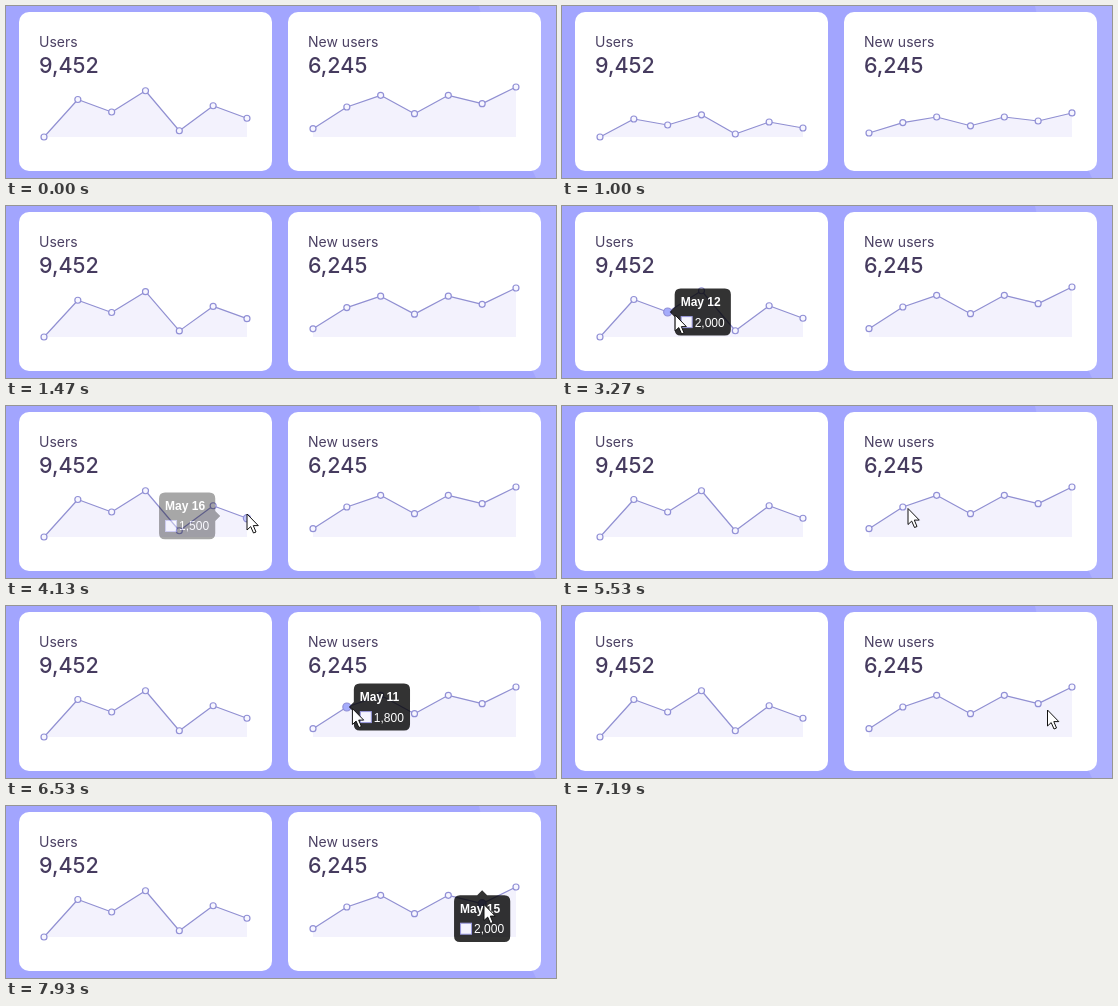
An HTML page for the animation above (7.99 s loop, 550 px wide and 172 px high).

```html
<!DOCTYPE html>
<html lang="en">
<head>
<meta charset="utf-8">
<title>User charts</title>
<style>
  html, body { margin: 0; width: 100%; height: 100%; overflow: hidden; background: #a2a5fe; }
  svg { display: block; width: 550px; height: 172px; }
  .card { fill: #fff; }
  .label { font: 400 14px Inter, sans-serif; fill: #4b4063; }
  .total { font: 500 21.5px Inter, sans-serif; fill: #463b5f; }
  .area { fill: #f3f2fd; }
  .line { fill: none; stroke: #9190d2; stroke-width: 1.2; stroke-linejoin: round; }
  .dot { stroke: #9190d6; stroke-width: 1.2; }
  .tip { fill: #000; fill-opacity: .8; }
  .tip-text { font: 12px "Liberation Sans", Arial, sans-serif; fill: #fff; }
  .title { font-weight: 700; }
  .swatch { fill: #f5f4fe; stroke: #9b9ae0; }
  .cursor { fill: #fff; stroke: #111; stroke-linejoin: round; }
</style>
</head>
<body>
<svg id="stage" viewBox="0 0 550 172">
  <rect width="550" height="172" fill="#a2a5fe"/>
  <path d="M473 0Q493 96 530 172H550V0Z" fill="#adb0ff"/>
</svg>
<script>
const LOOP = 7990, BASE = 131, STEP = 33.83, GROW_START = 850, GROW_TIME = 1000;
const TIP = { w: 56.2, h: 46.8, r: 6, gap: 7, caret: 5 };
const CHART_BOTTOM = 136;

const charts = [
  { card: 13, textX: 33, label: 'Users', total: '9,452', x: 38, scale: .0125,
    values: [0, 3000, 2000, 3700, 500, 2500, 1500],
    hovers: [{ i: 2, on: 2480, off: 3300, side: 'left' }, { i: 6, on: 4045, off: 4950, side: 'right' }] },
  { card: 282, textX: 302, label: 'New users', total: '6,245', x: 307, scale: .01667,
    values: [500, 1800, 2500, 1400, 2500, 2000, 3000],
    hovers: [{ i: 1, on: 5715, off: 6560, side: 'left' }, { i: 5, on: 7376, off: LOOP, side: 'top' }] }
];

// time, x, y of the pointer tip
const pointerPath = [
  [2130, 49, 56], [2640, 113, 109], [3260, 113, 109], [4000, 241, 108], [4200, 241, 108],
  [4860, 244, 110], [4920, 244, 110], [5360, 351, 105], [5530, 346, 102.5], [6510, 346, 102.5],
  [7190, 485.5, 104], [7350, 485.5, 104], [7620, 478, 98.5], [LOOP, 478, 98.5]
];

const clamp = v => Math.max(0, Math.min(1, v));
const mix = (a, b, k) => a + (b - a) * k;
const outQuart = k => 1 - (1 - clamp(k)) ** 4;
const smooth = k => k * k * (3 - 2 * k);

function add(parent, tag, attrs = {}, text = '') {
  const el = document.createElementNS('http://www.w3.org/2000/svg', tag);
  set(el, attrs);
  el.textContent = text;
  return parent.appendChild(el);
}

function set(el, attrs) {
  for (const key in attrs) el.setAttribute(key, attrs[key]);
}

const pointAt = (chart, i, grow = 1) =>
  [chart.x + i * STEP, BASE - chart.values[i] * chart.scale * grow];

function tipPlace(chart, { i, side }) {
  const [x, y] = pointAt(chart, i);
  if (side === 'top') return [x - TIP.w / 2, CHART_BOTTOM - TIP.h];
  const left = side === 'left' ? x + TIP.gap : x - TIP.gap - TIP.w;
  return [left, y - TIP.h / 2];
}

function tipShape(side) {
  const { w, h, r, caret: c } = TIP;
  const box = `M${r} 0H${w - r}Q${w} 0 ${w} ${r}V${h - r}Q${w} ${h} ${w - r} ${h}H${r}Q0 ${h} 0 ${h - r}V${r}Q0 0 ${r} 0Z`;
  const carets = {
    left: `M0 ${h / 2 - c}L${-c} ${h / 2}L0 ${h / 2 + c}Z`,
    right: `M${w} ${h / 2 - c}V${h / 2 + c}L${w + c} ${h / 2}Z`,
    top: `M${w / 2 - c} 0H${w / 2 + c}L${w / 2} ${-c}Z`
  };
  return box + carets[side];
}

const stage = document.getElementById('stage');

for (const chart of charts) {
  add(stage, 'rect', { class: 'card', x: chart.card, y: 6, width: 253, height: 159, rx: 10 });
  add(stage, 'text', { class: 'label', x: chart.textX, y: 41 }, chart.label);
  add(stage, 'text', { class: 'total', x: chart.textX, y: 67 }, chart.total);
  chart.area = add(stage, 'path', { class: 'area' });
  chart.line = add(stage, 'path', { class: 'line' });
  chart.dots = chart.values.map(() => add(stage, 'circle', { class: 'dot' }));
  chart.tip = add(stage, 'g');
  chart.tipBox = add(chart.tip, 'path', { class: 'tip' });
  chart.tipTitle = add(chart.tip, 'text', { class: 'tip-text title', x: 6, y: 17.5 });
  add(chart.tip, 'rect', { class: 'swatch', x: 6.5, y: 28, width: 11, height: 11 });
  chart.tipValue = add(chart.tip, 'text', { class: 'tip-text', x: 20, y: 38 });
}
const cursor = add(stage, 'path', { class: 'cursor', d: 'M0 0V16L3.7 12.6L6.5 19L9 18L6.3 11.6H11.3Z' });

function drawChart(chart, t) {
  const grow = t < GROW_START ? 1 : outQuart((t - GROW_START) / GROW_TIME);
  const points = chart.values.map((_, i) => pointAt(chart, i, grow));
  const path = 'M' + points.map(p => p.join(' ')).join('L');
  set(chart.line, { d: path });
  set(chart.area, { d: `${path}V${BASE}H${chart.x}Z` });

  chart.dots.forEach((dot, i) => {
    const hover = chart.hovers.find(h => h.i === i);
    const k = hover ? outQuart((t - hover.on) / 400) - outQuart((t - hover.off) / 400) : 0;
    const fill = [[247, 165], [246, 172], [255, 251]].map(([a, b]) => Math.round(mix(a, b, k)));
    set(dot, { cx: points[i][0], cy: points[i][1], r: 3 + k, fill: `rgb(${fill})` });
  });
}

function drawTip(chart, t) {
  const index = chart.hovers.findLastIndex(h => t >= h.on);
  const hover = chart.hovers[index];
  const opacity = hover ? clamp((t - hover.on) / 200) - clamp((t - hover.off) / 200) : 0;
  set(chart.tip, { opacity });
  if (!opacity) return;
  const from = tipPlace(chart, chart.hovers[Math.max(0, index - 1)]);
  const to = tipPlace(chart, hover);
  const k = outQuart((t - hover.on) / 400);
  set(chart.tip, { transform: `translate(${mix(from[0], to[0], k)} ${mix(from[1], to[1], k)})` });
  set(chart.tipBox, { d: tipShape(hover.side) });
  chart.tipTitle.textContent = `May ${10 + hover.i}`;
  chart.tipValue.textContent = chart.values[hover.i].toLocaleString('en-US');
}

function drawCursor(t) {
  const next = pointerPath.findIndex(p => p[0] > t);
  set(cursor, { visibility: next > 0 ? 'visible' : 'hidden' });
  if (next < 1) return;
  const [t0, x0, y0] = pointerPath[next - 1], [t1, x1, y1] = pointerPath[next];
  const k = smooth((t - t0) / (t1 - t0));
  set(cursor, { transform: `translate(${mix(x0, x1, k)} ${mix(y0, y1, k)})` });
}

function frame() {
  const t = performance.now() % LOOP;
  for (const chart of charts) {
    drawChart(chart, t);
    drawTip(chart, t);
  }
  drawCursor(t);
  requestAnimationFrame(frame);
}
frame();
</script>
</body>
</html>
```
